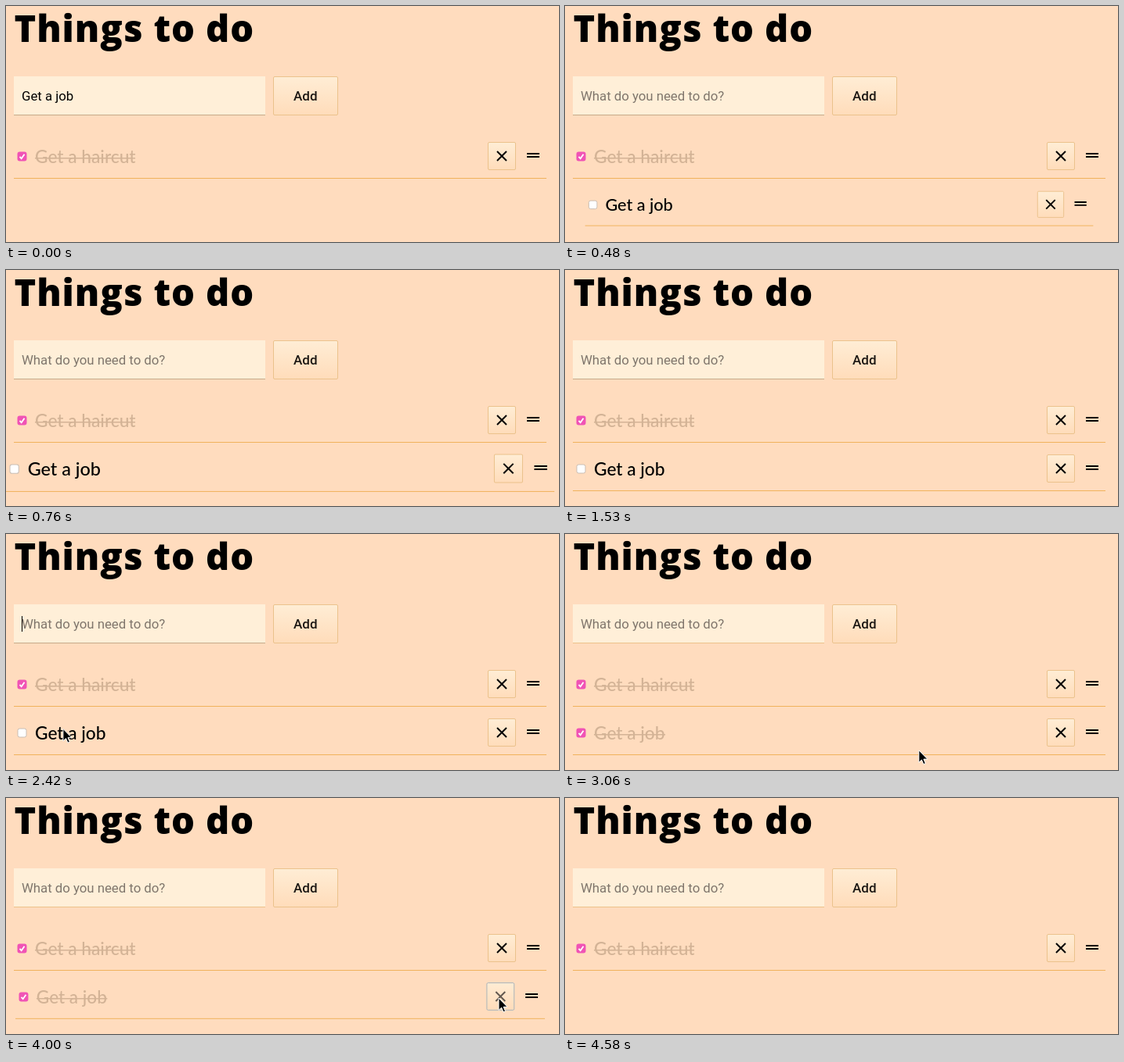
An HTML page for the animation above (5.16 s loop, 706 by 302 pixels).

```html
<!DOCTYPE html>
<html lang="en">
<head>
<meta charset="utf-8">
<title>Things to do</title>
<style>
  html, body { margin: 0; width: 100%; height: 100%; overflow: hidden; background: #ffdcbe; }
  svg { display: block; width: 706px; height: 302px; }
  .title { font: 800 47px "Open Sans", sans-serif; letter-spacing: .9px; }
  .field { font: 400 16.75px Roboto, sans-serif; }
  .add { font: 500 17px Roboto, sans-serif; fill: #1c1814; }
  .task { font: 500 22.7px Lato, sans-serif; }
  .done .task { fill: #d3b396; }
  .strike, .tick, .box-on { display: none; }
  .done .strike, .done .tick, .done .box-on { display: inline; }
  .done .box-off { display: none; }
  .btn { fill: url(#face); stroke: #ebc28c; }
  .x { stroke: #000; stroke-width: 2; }
  .hover .btn { stroke: #a9b5bb; }
  .hover .x { stroke: #625850; }
</style>
</head>
<body>
<svg viewBox="0 0 706 302" xmlns="http://www.w3.org/2000/svg">
  <defs>
    <linearGradient id="face" x2="0" y2="1">
      <stop offset="0" stop-color="#ffedd5"/>
      <stop offset="1" stop-color="#ffdcba"/>
    </linearGradient>
  </defs>
  <rect width="706" height="302" fill="#ffdcbe"/>
  <text class="title" x="10.5" y="46">Things to do</text>

  <rect x="10" y="90" width="321" height="50" fill="#ffefd8"/>
  <rect id="edge" x="10" y="139" width="321" height="1"/>
  <text id="field" class="field" x="20" y="121"></text>
  <rect id="caret" x="20" y="105" width="1" height="20"/>

  <rect class="btn" x="341.5" y="90.5" width="82" height="49" rx="1.5"/>
  <text class="add" x="367" y="121">Add</text>

  <g id="rows"></g>
  <path id="mouse" d="M0 0V15.5L3.6 12.2L6 17.8L8.5 16.7L6.1 11.3H11Z"
    stroke="#fff" stroke-width="1" stroke-linejoin="round"/>
</svg>
<script>
const LOOP = 5160;
const $ = id => document.getElementById(id);

function row(label, y, strikeEnd) {
  const g = document.createElementNS("http://www.w3.org/2000/svg", "g");
  g.innerHTML = `<g transform="translate(0 ${y})">
    <rect class="box-off" x="15" y="13" width="11" height="11" rx="2.5" fill="#fff" stroke="#c9bdb3"/>
    <rect class="box-on" x="14.5" y="12.5" width="12" height="12" rx="3" fill="#f053b5"/>
    <path class="tick" d="M17.5 18.8L19.7 21.2L23.5 15.8" fill="none" stroke="#fff" stroke-width="1.8"/>
    <text class="task" x="37" y="27">${label}</text>
    <rect class="strike" x="37" y="20" width="${strikeEnd - 37}" height="1.5" fill="#d3b396"/>
    <rect class="btn" x="615.5" y=".5" width="35" height="35" rx="1.5"/>
    <path class="x" d="M627 12L639 24M639 12L627 24"/>
    <path d="M665 14h16v2h-16zM665 18h16v2h-16z"/>
    <rect x="10" y="46" width="680" height="1" fill="#f0b25c"/>
  </g>`;
  $("rows").append(g);
  return g;
}

row("Get a haircut", 174, 165).classList.add("done");
const job = row("Get a job", 236, 128);

function bezier(x1, y1, x2, y2) {
  const at = (a, b, u) => 3 * a * u * (1 - u) ** 2 + 3 * b * u * u * (1 - u) + u ** 3;
  return p => {
    if (p <= 0) return 0;
    if (p >= 1) return 1;
    let lo = 0, hi = 1;
    for (let i = 0; i < 24; i++) {
      const mid = (lo + hi) / 2;
      if (at(x1, x2, mid) < p) lo = mid; else hi = mid;
    }
    return at(y1, y2, lo);
  };
}
const linear = p => Math.min(p, 1);
const pop = bezier(.175, .885, .32, 1.275);
const ease = bezier(.42, 0, .58, 1);
const glide = bezier(.3, .1, .3, 1);

// Pointer moves: each a curve from a to b, bent towards c
const moves = [
  { from: 2180, to: 2540, a: [228, 296], c: [89, 235], b: [18, 252], timing: linear },
  { from: 2760, to: 3530, a: [18, 252], c: [453, 301], b: [629, 256], timing: glide },
  { from: 4460, to: 4580, a: [635, 268], c: [641, 278], b: [654, 310], timing: linear }
];

const snap = (t, from, step) => from + Math.floor((t - from) / step) * step;
const between = (t, a, b) => t >= a && t < b;
const show = (el, on) => el.setAttribute("visibility", on ? "visible" : "hidden");

function drawField(t) {
  const typed = t < 300;
  $("field").textContent = typed ? "Get a job" : "What do you need to do?";
  $("field").setAttribute("fill", typed ? "#000" : "#7f766c");
  $("edge").setAttribute("fill", t < 2540 ? "#c4ab8a" : "#ecc18a");
  show($("caret"), between(t, 1000, 1530) || between(t, 2070, 2540));
}

function drawJob(t) {
  const grow = pop((snap(t, 300, 57) - 314) / 480);
  const out = ease((snap(t, 3950, 57) - 3930) / 360);
  const scale = grow * (1 - out);
  job.setAttribute("transform", `translate(350 252) scale(${scale}) translate(-350 -252)`);
  job.setAttribute("opacity", 1 - out);
  show(job, scale > 0);
  job.classList.toggle("done", t >= 2650);
  job.classList.toggle("hover", t >= 3300);
}

function drawMouse(t) {
  const move = moves.findLast(m => m.from <= t);
  show($("mouse"), move && t < 4580);
  if (!move) return;
  const { from, to, a, b, c, timing } = move;
  const u = timing((snap(t, from, 60) - from) / (to - from)), v = 1 - u;
  const [x, y] = a.map((n, i) => v * v * n + 2 * u * v * c[i] + u * u * b[i]);
  $("mouse").setAttribute("transform", `translate(${x} ${y})`);
}

const start = performance.now();
function frame() {
  const t = (performance.now() - start) % LOOP;
  drawField(t);
  drawJob(t);
  drawMouse(t);
  requestAnimationFrame(frame);
}
frame();
</script>
</body>
</html>
```
